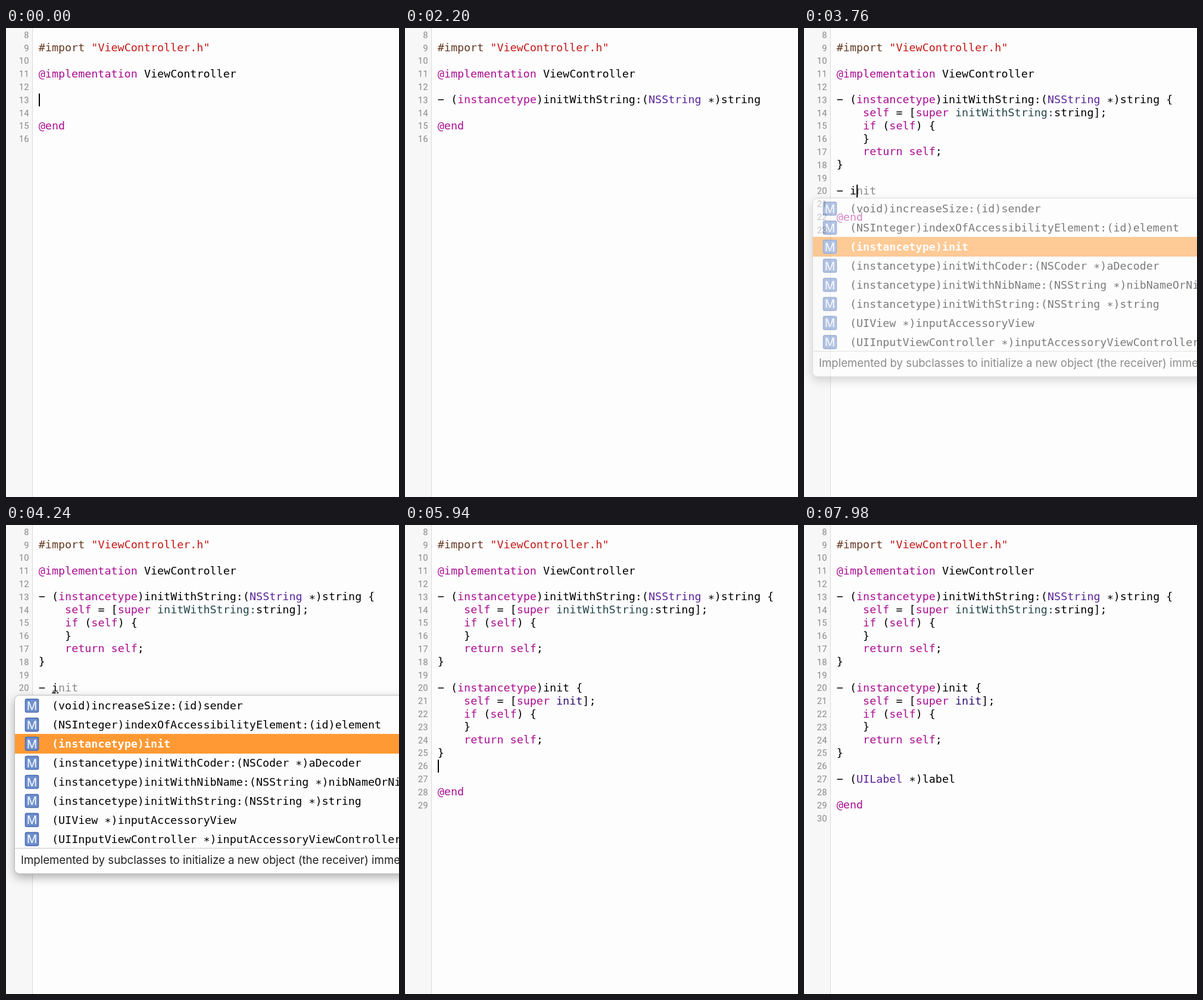
Write an HTML page that moves like this. It is 660 px wide and 786 px high and loops after 8 s.

```html
<!DOCTYPE html>
<html lang="en">
<head>
<meta charset="utf-8">
<title>Code completion</title>
<style>
  html, body { margin: 0; width: 100%; height: 100%; overflow: hidden; background: #fdfdfe; }
  svg { display: block; width: 660px; height: 786px; }
  text { white-space: pre; font: 18.39px "DejaVu Sans Mono", monospace; fill: #000; }
  .num { font: 14.8px Roboto, sans-serif; fill: #8a8a8a; text-anchor: end; }
  .keyword { fill: #aa0d91; }
  .type { fill: #5c2699; }
  .call { fill: #26474b; }
  .system { fill: #2e0d6e; }
  .string { fill: #c41a16; }
  .macro { fill: #643820; }
  .ghost { fill: #8a8a8a; }
  .chosen { fill: #fff; font-weight: bold; }
  .doc { font: 18.62px Inter, sans-serif; fill: #222; }
  .badge { font: 19px Inter, sans-serif; fill: #fff; text-anchor: middle; }
  .popup { filter: drop-shadow(0 6px 8px rgba(0, 0, 0, .3)); }
</style>
</head>
<body>
<svg id="stage" viewBox="0 0 660 786"></svg>
<script>
const LOOP = 8000, X0 = 54.8, ADV = 11.07, PITCH = 21.81, ROW = 31.95, FADE = 200;
const GREY = '#8a8a8a';
const stage = document.getElementById('stage');

const initRows = [
  '(instancetype)init',
  '(instancetype)initWithCoder:(NSCoder *)aDecoder',
  '(instancetype)initWithNibName:(NSString *)nibNameOrNil bundle:(NSBundle *)nibBundleOrNil',
  '(instancetype)initWithString:(NSString *)string'
];

// keys: [time, text of the line being typed]
const methods = [
  {
    start: 0, open: 700, accept: 1680, fill: 2760, enter: 3020,
    sig: '− (instancetype)initWithString:(NSString *)string',
    call: 'initWithString:string', complete: 'initWithString:', prefix: 4,
    keys: [[360, '−'], [460, '− '], [560, '− i'], [640, '− in'], [740, '− ini']],
    brace: 2540, rows: initRows, pick: 3, width: 800
  },
  {
    start: 3180, open: 3660, accept: 4350, fill: 5460, enter: 5840,
    sig: '− (instancetype)init',
    call: 'init', complete: 'init', prefix: 1,
    keys: [[3380, '−'], [3480, '− '], [3620, '− i']],
    brace: 5240,
    rows: ['(void)increaseSize:(id)sender',
      '(NSInteger)indexOfAccessibilityElement:(id)element',
      ...initRows,
      '(UIView *)inputAccessoryView',
      '(UIInputViewController *)inputAccessoryViewController'],
    pick: 2, width: 800,
    doc: 'Implemented by subclasses to initialize a new object (the receiver) immediately after'
  },
  {
    start: 6040, open: 6640, accept: 7450, fill: Infinity, enter: Infinity,
    sig: '− (UILabel *)label',
    complete: 'label', prefix: 1,
    keys: [[6340, '−'], [6440, '− '], [6600, '− l']],
    brace: Infinity,
    rows: ['(UILabel *)label',
      '(NSArray *)labelAtIndexes:(NSIndexSet *)indexes',
      '(void)layoutSublayersOfLayer:(CALayer *)layer',
      '(void)loadView',
      '(void)loadViewIfNeeded'],
    pick: 0, width: 630.5
  }
];

for (const m of methods)
  m.keys.push([m.accept, m.sig], [m.brace, m.sig + ' {']);

const moments = methods.flatMap(m => [m.start, m.fill, m.enter, ...m.keys.map(k => k[0])]);

const syntax = new RegExp([
  '(?<macro>#import)', '(?<string>"[^"]*")',
  '(?<keyword>@\\w+|\\b(?:instancetype|self|super|if|return)\\b)',
  '(?<type>\\b(?:NSString|UILabel)\\b)',
  '(?<system>(?<=super )init\\b)', '(?<call>(?<=super )\\w+:)'
].join('|'), 'g');

const colX = col => X0 + col * ADV;
const baseline = row => 17.2 + row * PITCH;

// Code asterisks sit at mid height
const glyphs = s => s.replace(/\*\)/g, '<tspan dy="3.5">*</tspan><tspan dy="-3.5">)</tspan>');

const label = (s, x, y, cls = '') =>
  `<text x="${x.toFixed(2)}" y="${y.toFixed(2)}" class="${cls}">${glyphs(s)}</text>`;

const rect = (x, y, w, h, fill, more = '') =>
  `<rect x="${x}" y="${y}" width="${w}" height="${h}" fill="${fill}" ${more}/>`;

function codeLine(s, y) {
  let out = '', at = 0;
  const add = (part, col, cls) => {
    if (part.trim()) out += label(part, colX(col), y, cls);
  };
  for (const hit of s.matchAll(syntax)) {
    add(s.slice(at, hit.index), at);
    add(hit[0], hit.index, Object.keys(hit.groups).find(k => hit.groups[k]));
    at = hit.index + hit[0].length;
  }
  add(s.slice(at), at);
  return out;
}

function documentAt(t) {
  const lines = ['', '#import "ViewController.h"', '', '@implementation ViewController', ''];
  let row, col, active, typed;
  for (const m of methods) {
    if (t < m.start) break;
    active = m;
    typed = (m.keys.filter(k => k[0] <= t).pop() || [0, ''])[1];
    lines.push(typed);
    if (t >= m.fill)
      lines.push(`    self = [super ${m.call}];`, '    if (self) {', '    }', '    return self;', '}');
    row = lines.length - 1;
    col = lines[row].length;
    if (t >= m.enter) {
      lines.push('');
      row++;
      col = 0;
    }
  }
  lines.push('', '@end', '');
  return { lines, row, col, active, typed };
}

function popup(m, top, p) {
  const listH = ROW * m.rows.length + 1.5;
  const h = listH + (m.doc ? 42 : 0);
  const box = `x="14.5" y="${top}" width="${m.width}" height="${h}" rx="8"`;
  let out = `<clipPath id="frame"><rect ${box}/></clipPath>
    <g class="popup" opacity="${p}"><rect ${box} fill="#fdfdfe"/><g clip-path="url(#frame)">`;
  m.rows.forEach((s, i) => {
    const mid = top + 17.5 + ROW * i, on = i === m.pick;
    if (on) out += rect(14, mid - 16.5, m.width + 1, 33, '#ff9933');
    out += rect(32.5, mid - 11, 22, 22, '#6f90cf', 'rx="2.5" stroke="#4a6cb0" stroke-width="1.6"');
    out += label('M', 43.5, mid + 7, 'badge') + label(s, colX(2), mid + 6.2, on ? 'chosen' : '');
  });
  if (m.doc) {
    out += rect(14, top + listH - 1, m.width, 1, '#c4c4c4');
    out += label(m.doc, 25, top + listH + 25.5, 'doc');
  }
  return out + `</g><rect ${box} fill="none" stroke="#bcbcbc"/></g>`;
}

function underline(m, col, y) {
  const dash = (from, to, color) => from < to
    ? `<path d="M${colX(from) + 0.5} ${y}H${colX(to)}" stroke="${color}" stroke-width="2" stroke-dasharray="6 2"/>` : '';
  const end = 2 + m.prefix;
  return dash(2, Math.min(col, end), '#000') + dash(col, end, GREY);
}

function draw(t) {
  const { lines, row, col, active: m, typed } = documentAt(t);
  const y = baseline(row);
  let out = rect(0, 0, 660, 786, '#fdfdfe') + rect(0, 0, 44, 786, '#f7f7f7') + rect(44, 0, 1, 786, '#dadada');
  lines.forEach((s, i) => {
    out += label(String(i + 8), 38.5, baseline(i) - 0.5, 'num') + codeLine(s, baseline(i));
  });

  const open = t >= m.open && t < m.accept;
  const p = Math.min(1, (t - m.open) / FADE);
  if (open) {
    out += label(m.complete.slice(typed.length - 2), colX(col), y, 'ghost');
    if (p === 1) out += underline(m, col, y + 2.3);
    out += popup(m, y + 6.3, p);
  }

  const last = Math.max(...moments.filter(v => v <= t));
  if ((t - last) % 1000 < 500) out += rect(colX(col) + 0.2, y - 16.4, 2, 21.5, '#000');
  return out;
}

let shown = '';
function tick(now) {
  const markup = draw(now % LOOP);
  if (markup !== shown) stage.innerHTML = shown = markup;
  requestAnimationFrame(tick);
}
tick(0);
</script>
</body>
</html>
```
